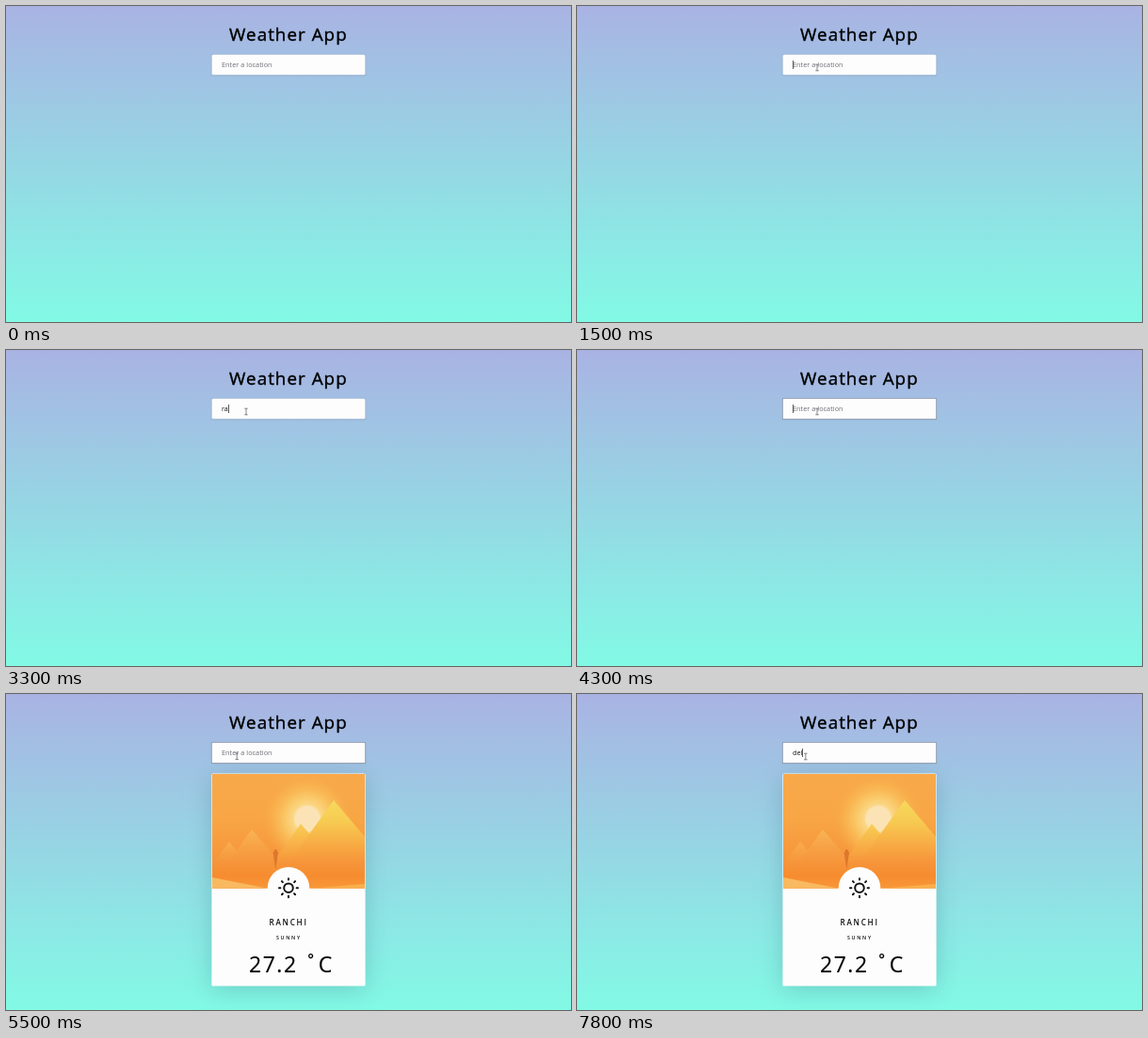
An HTML page with a canvas for the animation above (8 s loop, 600x336 px).

```html
<!DOCTYPE html>
<html lang="en">
<head>
<meta charset="utf-8">
<title>Weather App</title>
<style>
html, body { margin: 0; width: 100%; height: 100%; overflow: hidden; }
canvas { display: block; width: 600px; height: 336px; }
</style>
</head>
<body>
<canvas id="stage" width="600" height="336"></canvas>
<script>
const LOOP = 8000;
const TICK = 100;
const CLEARED = 4300;
const CARD_SHOWN = 4400;
const ctx = document.getElementById('stage').getContext('2d');

const entries = [
  { word: 'ranchi', start: 3000, step: 200, end: CLEARED },
  { word: 'del', start: 7500, step: 150, end: LOOP }
];
const clicks = [500, 2300, 6200];

function typedAt(t) {
  const entry = entries.find(e => t >= e.start && t < e.end);
  return entry ? entry.word.slice(0, Math.floor((t - entry.start) / entry.step) + 1) : '';
}

// The blink restarts at every click and key press.
function caretOn(t) {
  const keys = entries.flatMap(e => [...e.word].map((_, i) => e.start + i * e.step));
  const last = Math.max(...[...clicks, ...keys].filter(time => time <= t));
  return (t - last) % 1000 < 500;
}

function ease(t, from, to) {
  const u = Math.min(1, Math.max(0, (t - from) / (to - from)));
  return u * u * (3 - 2 * u);
}

function linear(y0, y1, ...colors) {
  const g = ctx.createLinearGradient(0, y0, 0, y1);
  colors.forEach((c, i) => g.addColorStop(i / (colors.length - 1), c));
  return g;
}

function radial(x, y, r0, r1, ...colors) {
  const g = ctx.createRadialGradient(x, y, r0, x, y, r1);
  colors.forEach((c, i) => g.addColorStop(i / (colors.length - 1), c));
  return g;
}

function rect(x, y, w, h, fill) {
  ctx.fillStyle = fill;
  ctx.fillRect(x, y, w, h);
}

function disc(x, y, r, fill) {
  ctx.beginPath();
  ctx.arc(x, y, r, 0, Math.PI * 2);
  ctx.fillStyle = fill;
  ctx.fill();
}

function panel(x, y, w, h, shadowColor, blur, dy) {
  ctx.save();
  ctx.shadowColor = shadowColor;
  ctx.shadowBlur = blur;
  ctx.shadowOffsetY = dy;
  ctx.beginPath();
  ctx.roundRect(x, y, w, h, 1.5);
  ctx.fillStyle = '#fdfdfe';
  ctx.fill();
  ctx.restore();
}

function triangle(x, y, left, right, base, fill) {
  ctx.beginPath();
  ctx.moveTo(x, y);
  ctx.lineTo(x + right, base);
  ctx.lineTo(x - left, base);
  ctx.fillStyle = fill;
  ctx.fill();
}

function text(str, x, y, size, spacing, color = '#000', weight = 400, outline = 0) {
  ctx.font = `${weight} ${size}px "Open Sans", "Noto Sans", sans-serif`;
  ctx.letterSpacing = spacing + 'px';
  ctx.fillStyle = ctx.strokeStyle = color;
  ctx.fillText(str, x, y);
  if (outline) {
    ctx.lineWidth = outline;
    ctx.strokeText(str, x, y);
  }
  return ctx.measureText(str).width;
}

// All slopes share one steepness and fade into the haze at the base.
function mountain(x, y, ...colors) {
  const base = 180, height = base - y;
  triangle(x, y, height * 0.72, height * 0.85, base, linear(y, base, ...colors, '#f6943a'));
}

function drawLandscape() {
  ctx.save();
  ctx.beginPath();
  ctx.rect(219, 85, 162, 121.5);
  ctx.clip();
  rect(219, 85, 162, 122, linear(85, 180, '#f8a94a', '#f8a645', '#f6943a'));
  disc(320, 132.5, 48, radial(320, 132.5, 12, 48,
    '#fbdc90', '#fac766', 'rgba(249,184,82,.6)', 'rgba(248,168,70,0)'));
  disc(320, 132.5, 14.5, radial(320, 132.5, 12.5, 14.5, '#fbe3b6', '#fbdd98'));

  mountain(237, 157, '#f8ad4d');
  mountain(261, 144, '#f9b555', '#f7a246');
  mountain(313, 138, '#f8cf54', '#f8b248');
  mountain(348, 113, '#f6d95c', '#f7cb52', '#f8ae45');

  rect(219, 180, 162, 27, linear(180, 207, '#f6943a', '#f68c2e', '#f8983a'));
  triangle(219, 195, 0, 60, 207, '#f9b960');
  triangle(381, 202, 60, 0, 207, '#f9b04e');
  disc(286.3, 167, 1.7, '#d9752c');
  triangle(286.3, 187, 2.8, 2.8, 168, '#dd772c');
  ctx.restore();
}

function drawSunIcon(x, y) {
  ctx.strokeStyle = '#111';
  ctx.lineWidth = 2;
  ctx.lineCap = 'round';
  ctx.beginPath();
  ctx.arc(x, y, 4.8, 0, Math.PI * 2);
  for (let i = 0; i < 8; i++) {
    const c = Math.cos(i * Math.PI / 4), s = Math.sin(i * Math.PI / 4);
    ctx.moveTo(x + c * 8.6, y + s * 8.6);
    ctx.lineTo(x + c * 10, y + s * 10);
  }
  ctx.stroke();
}

function drawCard() {
  panel(218.4, 84.4, 163.2, 226.2, 'rgba(0,50,70,.2)', 26, 4);
  drawLandscape();
  disc(300, 206.3, 22.3, '#fdfdfe');
  drawSunIcon(300, 206.2);
  text('RANCHI', 279.5, 246, 8.2, 1.7, '#111', 600);
  text('SUNNY', 287, 261, 5.3, 1.7, '#111', 600);
  text('27.2 ˚C', 258, 295.6, 23, 1.5, '#000', 400, 0.15);
}

function drawInput(t) {
  panel(218.6, 51.8, 162.8, 21.4, 'rgba(0,0,0,.18)', 2, 0.5);
  if (t >= CLEARED) {
    ctx.strokeStyle = 'rgba(140,145,155,.55)';
    ctx.lineWidth = 1;
    ctx.strokeRect(218.5, 51.5, 163, 22);
  }
  const typed = typedAt(t);
  const width = text(typed || 'Enter a location', 229, 65, 7.2, 0.08, typed ? '#111' : '#6c6c72');
  if (caretOn(t)) rect(Math.round(229 + (typed ? width : 0)), 58, 0.8, 9, '#333');
}

function drawPointer(t) {
  if (t < TICK) return;
  const enter = ease(t, 100, 600), shift = ease(t, 5000, 5700);
  const x = 268 - 13 * enter - 12.2 * shift;
  const y = 72 - 6.5 * enter + shift;
  ctx.strokeStyle = '#666';
  ctx.lineWidth = 0.8;
  ctx.lineCap = 'butt';
  ctx.beginPath();
  ctx.moveTo(x, y - 3.2);
  ctx.lineTo(x, y + 3.2);
  for (const dy of [-3.3, 3.3]) {
    ctx.moveTo(x - 1.7, y + dy);
    ctx.lineTo(x + 1.7, y + dy);
  }
  ctx.stroke();
}

function draw(now) {
  const t = Math.floor((now % LOOP) / TICK) * TICK;
  rect(0, 0, 600, 336, linear(0, 336, '#a9b3e3', '#82fae5'));
  text('Weather App', 237, 37.2, 18.8, 1.05, '#000', 400, 0.4);
  if (t >= CARD_SHOWN) drawCard();
  drawInput(t);
  drawPointer(t);
  requestAnimationFrame(draw);
}
requestAnimationFrame(draw);
</script>
</body>
</html>
```
